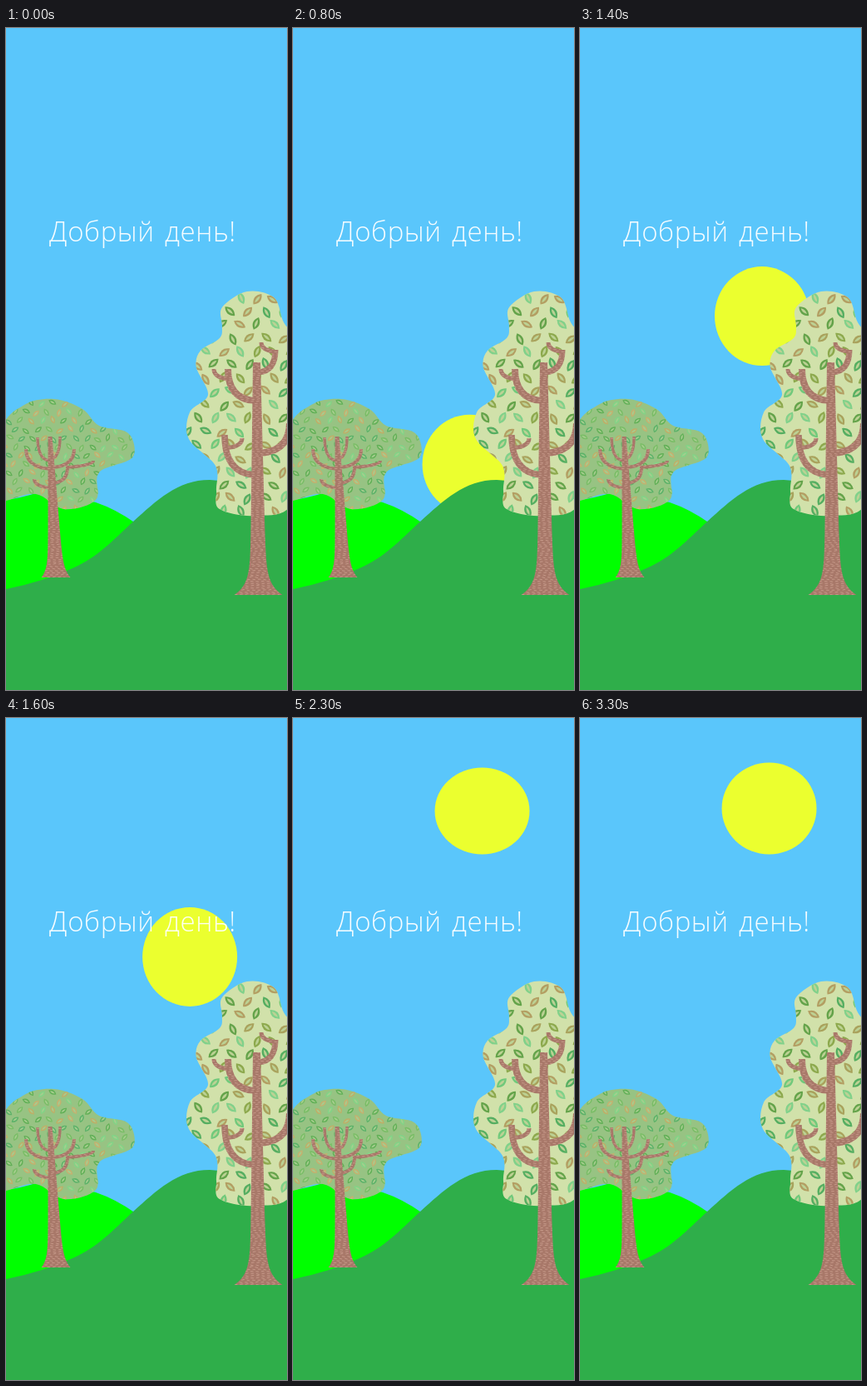
These frames come from a looping animation (338 px wide and 794 px high, 4300 ms). An HTML page with a canvas:

```html
<!DOCTYPE html>
<html lang="ru">
<head>
<meta charset="utf-8">
<title>Добрый день!</title>
<style>
  html, body { margin: 0; width: 100%; height: 100%; overflow: hidden; background: #5ac6fb; }
  canvas { display: block; }
</style>
</head>
<body>
<canvas id="stage" width="338" height="794"></canvas>
<script>
const W = 338, H = 794, LOOP = 4300, STEP = 100;
const RISE_END = 2200, SETTLED = 3000;
const ctx = document.getElementById('stage').getContext('2d');

function makeLayer() {
  const layer = document.createElement('canvas');
  layer.width = W;
  layer.height = H;
  return layer;
}

function seeded(seed) {
  return () => (seed = (seed * 16807) % 2147483647) / 2147483647;
}

// Closed Catmull-Rom curve through a few key points.
function smoothPath(points) {
  const path = new Path2D(), n = points.length;
  const at = i => points[(i + n) % n];
  path.moveTo(...points[0]);
  for (let i = 0; i < n; i++) {
    const [a, b, c, d] = [at(i - 1), at(i), at(i + 1), at(i + 2)];
    path.bezierCurveTo(
      b[0] + (c[0] - a[0]) / 6, b[1] + (c[1] - a[1]) / 6,
      c[0] - (d[0] - b[0]) / 6, c[1] - (d[1] - b[1]) / 6, c[0], c[1]);
  }
  return path;
}

function leafShape(g, length, color) {
  g.beginPath();
  g.moveTo(-length / 2, 0);
  g.quadraticCurveTo(0, -length / 2, length / 2, 0);
  g.quadraticCurveTo(0, length / 2, -length / 2, 0);
  g.fillStyle = color;
  g.fill();
}

function drawLeaf(g, x, y, angle, length, color, core) {
  g.save();
  g.translate(x, y);
  g.rotate(angle);
  leafShape(g, length, color);
  g.scale(1, .6);
  leafShape(g, length * .62, core);
  g.restore();
}

// Leaves in staggered rows, each nudged and turned a little.
function drawCanopy(g, { canopy, fill, core, colors, leaf, seed }) {
  const random = seeded(seed), path = smoothPath(canopy);
  const dx = leaf * 1.28, dy = leaf;
  const left = Math.min(...canopy.map(p => p[0]));
  const top = Math.min(...canopy.map(p => p[1])) + leaf / 2;
  g.save();
  g.fillStyle = fill;
  g.fill(path);
  g.clip(path);
  for (let y = top, row = 0; y < 590; y += dy, row++) {
    for (let x = left + (row % 2) * dx / 2, col = 0; x < left + 165; x += dx, col++) {
      const lean = (row + col) % 2 ? .8 : 2.2;
      const color = colors[Math.floor(random() * colors.length)];
      drawLeaf(g, x + random() * 4 - 2, y + random() * 4 - 2,
        lean + random() * .8 - .4, leaf, color, core);
    }
  }
  g.restore();
}

// Slowly widening stem with an exponential flare at the root.
function trunkPath({ top, base, topX, baseX, topHalf, baseHalf, flare, decay }) {
  const left = [], right = [];
  for (let y = top; y <= base; y++) {
    const p = (y - top) / (base - top), x = topX + (baseX - topX) * p;
    const half = topHalf + (baseHalf - topHalf) * p + flare * Math.exp((y - base) / decay);
    left.push([x - half, y]);
    right.unshift([x + half, y]);
  }
  return new Path2D('M' + left.concat(right).join('L') + 'Z');
}

function drawWood(g, { trunk, branches, seed }) {
  const layer = makeLayer(), w = layer.getContext('2d'), random = seeded(seed);
  w.fillStyle = w.strokeStyle = '#a87869';
  w.fill(trunkPath(trunk));
  for (const [tipX, tipY, joinX, joinY, width] of branches) {
    w.lineWidth = width;
    w.beginPath();
    w.moveTo(tipX, tipY);
    w.quadraticCurveTo(tipX, joinY - 2, joinX, joinY);
    w.stroke();
  }
  w.globalCompositeOperation = 'source-atop';
  w.strokeStyle = '#cda08f';
  w.lineWidth = .8;
  for (let y = 370; y < 685; y += 2.6) {
    for (let x = random() * 5; x < W; x += 6.5) {
      w.beginPath();
      w.moveTo(x, y);
      w.lineTo(x + 3.5, y + random() * 2 - 1);
      w.stroke();
    }
  }
  g.drawImage(layer, 0, 0);
}

const leftTree = {
  seed: 41, leaf: 10.5, fill: '#97c383', core: '#a6cd8e',
  colors: ['#62b057', '#5cb269', '#c4b06f', '#82d386', '#bfae68', '#79bd66'],
  canopy: [[-6, 483], [22, 452], [58, 445], [92, 457], [112, 477], [147, 486], [152, 515],
    [112, 533], [108, 566], [70, 577], [36, 559], [0, 567], [-10, 567]],
  trunk: { top: 490, base: 659, topX: 53, baseX: 60, topHalf: 2.5, baseHalf: 9.5, flare: 8, decay: 10 },
  // tip x, tip y, joint x, joint y, width
  branches: [[38, 491, 52, 519, 3.5], [65, 490, 54, 517, 3.5], [24, 505, 54, 529, 4],
    [82, 505, 56, 527, 4], [105, 519, 72, 527, 4], [74, 527, 57, 546, 4], [34, 541, 56, 552, 4]]
};

const rightTree = {
  seed: 83, leaf: 16, fill: '#d1e1aa', core: '#bcd294',
  colors: ['#64a34a', '#a9a25c', '#70c97b', '#8da94d', '#b39e62', '#55ae61', '#80d18a'],
  canopy: [[260, 335], [290, 316], [322, 323], [333, 351], [346, 380], [350, 480], [344, 570],
    [300, 585], [257, 577], [253, 555], [252, 525], [220, 493], [221, 461], [243, 440],
    [229, 407], [234, 387], [257, 372], [260, 357]],
  trunk: { top: 401, base: 680, topX: 301.5, baseX: 303.5, topHalf: 4.5, baseHalf: 10, flare: 19, decay: 13 },
  branches: [[267, 409, 299, 447, 8], [250, 409, 267, 421, 5], [324, 386, 304, 413, 7],
    [307, 377, 322, 388, 5], [263, 488, 299, 536, 7.5], [284, 492, 264, 504, 5], [341, 474, 304, 510, 8]]
};

function makeForeground() {
  const layer = makeLayer(), g = layer.getContext('2d');
  g.fillStyle = '#00ff00';
  g.fill(new Path2D('M0 566 Q20 563 36 558 Q75 560 108 569 Q132 577 156 594 L150 680 H0Z'));
  g.fillStyle = '#2fae4a';
  g.fill(new Path2D('M0 673 Q45 664 80 648 C110 635 128 615 153 592 ' +
    'C181 567 206 542 245 542 Q295 544 338 573 V794 H0Z'));
  for (const tree of [leftTree, rightTree]) {
    drawCanopy(g, tree);
    drawWood(g, tree);
  }
  return layer;
}

// Steady rise, then the top edge squashes and stretches while the bottom rests.
function sunAt(t) {
  const rise = Math.min(t, RISE_END);
  const x = 204 + rise * .0107, y = 760 - rise * .296;
  if (t <= RISE_END) return { x, top: y - 59.5, bottom: y + 59.5 };
  const swing = t < SETTLED ? -12 * Math.sin(Math.PI * (t - 2400) / 600) : 0;
  return { x, top: 53.5 + swing, bottom: 163.5 };
}

const foreground = makeForeground();

function draw(t) {
  const { x, top, bottom } = sunAt(t);
  ctx.fillStyle = '#5ac6fb';
  ctx.fillRect(0, 0, W, H);
  ctx.fillStyle = t < 700 ? '#fdfb18' : '#ebff2f';
  ctx.beginPath();
  ctx.ellipse(x, (top + bottom) / 2, 57, (bottom - top) / 2, 0, 0, Math.PI * 2);
  ctx.fill();
  ctx.drawImage(foreground, 0, 0);
  ctx.font = '300 33px "Open Sans", "Noto Sans", sans-serif';
  ctx.letterSpacing = '0.6px';
  ctx.wordSpacing = '3px';
  ctx.fillStyle = 'rgba(255, 255, 255, .95)';
  ctx.fillText('Добрый день!', 52, 256);
}

const start = performance.now();
function tick() {
  const t = (performance.now() - start) % LOOP;
  draw(Math.floor(t / STEP) * STEP);
  requestAnimationFrame(tick);
}
tick();
</script>
</body>
</html>
```
